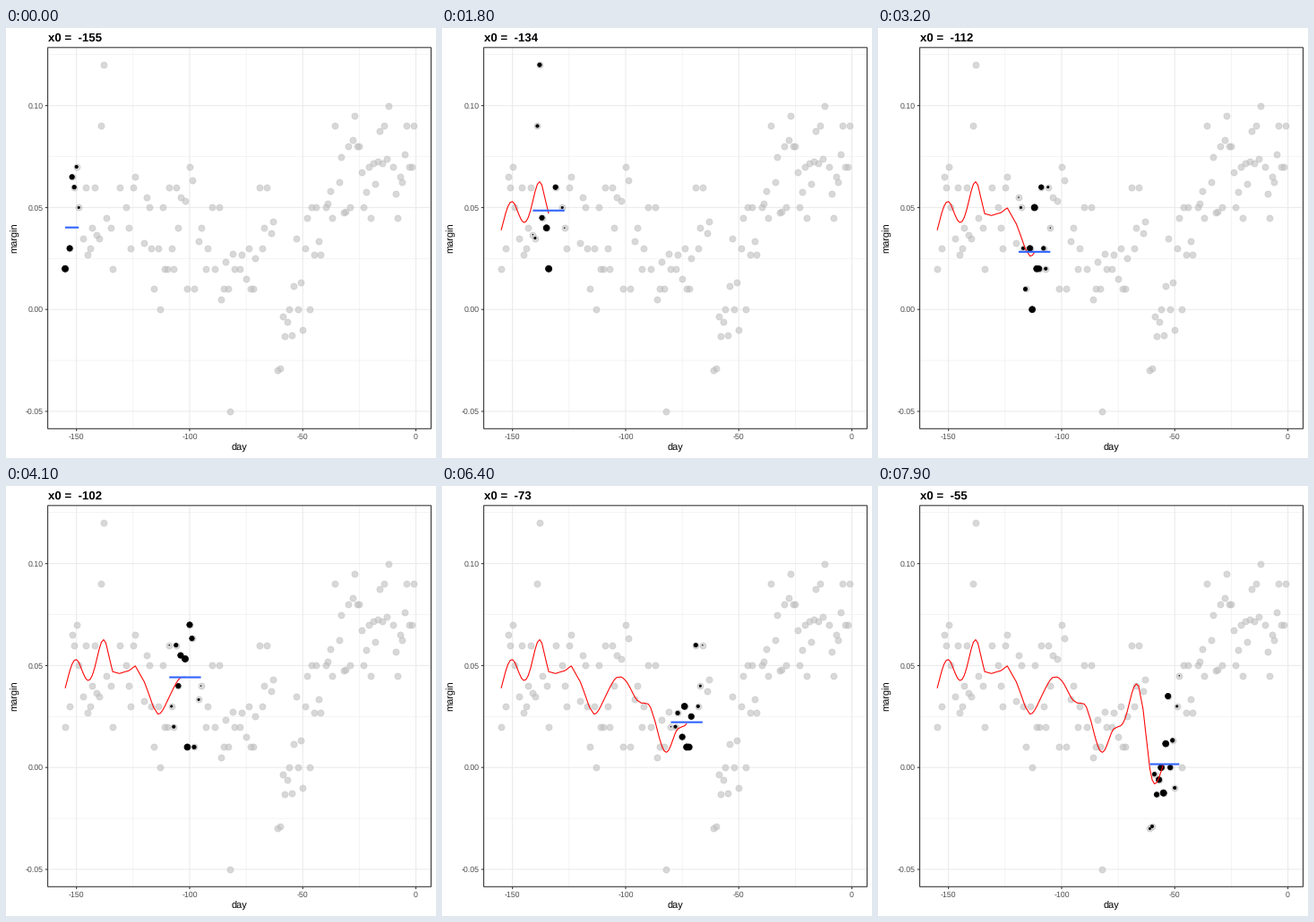
Recreate the animation shown at these times as a matplotlib script. Size 480x480 px, loop 8000 ms.

```python
import numpy as np
import matplotlib.pyplot as plt
from matplotlib.animation import FuncAnimation
from matplotlib.patches import Rectangle

plt.rcParams.update({"path.snap": False, "text.hinting": "none",
                     "font.family": "Liberation Sans"})

SIZE, DPI = 480, 72
FRAMES, INTERVAL = 80, 100
LEFT, RIGHT, TOP, BOTTOM = 46.6, 474.5, 21.8, 447.3
X_MIN, X_MAX, Y_MIN, Y_MAX = -162.7, 6.7, -0.0585, 0.1285
THIN, LINE, THICK = 0.53, 1.07, 2.13
WINDOW, LOCAL_SD = 7, 2.8
CURVE_SD = 0.3706506 * WINDOW

SKIPPED = {-154, -148, -136, -133, -132, -130, -129, -123, -122, -121, -115,
           -103, -97, -94, -91, -88, -79, -76, -70, -65, -62, -41, -35, -11}
days = np.array([d for d in range(-155, 0) if d not in SKIPPED])
# margins in percent, one per day
margin = np.array([
    2, 3, 6.5, 6, 7, 5, 3.5, 6, 2.67, 3, 4, 6, 3.67, 3.5, 9, 12, 4.5, 4, 2, 6,
    5, 4, 3, 6, 6.5, 3.25, 5.5, 5, 3, 1, 3, 0, 5, 2, 2, 6, 3, 2, 6, 4,
    5.5, 5.33, 1, 7, 6.33, 1, 3.33, 4, 2, 3, 5, 2, 5, 0.5, 1, 2.33, 1, -5,
    2.75, 2, 2, 2.67, 1.5, 3, 1, 1, 2.5, 6, 3, 4, 6, 3.75, 4.33, -3, -2.89,
    -0.33, -1.33, -0.6, 0, -1.25, 1.17, 3.5, 0, 1.33, -1, 3, 4.5, 0, 5, 2.67,
    5, 3.33, 2.67, 5, 5.2, 5.83, 4.5, 9, 6.25, 7.5, 4.75, 4.8, 8, 5, 8.33,
    9.5, 8, 8, 6.75, 5, 5.75, 7, 4.5, 7.17, 6.17, 7.25, 8.75, 7.17, 9, 7.4,
    10, 7, 5.67, 4.5, 6.5, 6.25, 7.6, 9, 7, 7, 9]) / 100


def px(day):
    return LEFT + (day - X_MIN) / (X_MAX - X_MIN) * (RIGHT - LEFT)


def py(value):
    return BOTTOM - (value - Y_MIN) / (Y_MAX - Y_MIN) * (BOTTOM - TOP)


def gauss(dist, sd):
    return np.exp(-0.5 * (dist / sd) ** 2)


def kernel_mean(x0):
    dist = np.abs(days - x0)
    w = gauss(dist, CURVE_SD) * (dist <= 4 * CURVE_SD)
    return w @ margin / w.sum()


def dot_width(size):
    return 0.75 * (2.845 * size + 0.945)


curve = np.array([kernel_mean(d) for d in days])

fig = plt.figure(figsize=(SIZE / DPI, SIZE / DPI), dpi=DPI, facecolor="white")
ax = fig.add_axes([0, 0, 1, 1])
ax.set_xlim(0, SIZE)
ax.set_ylim(SIZE, 0)
ax.axis("off")


def segment(x, y, color, width, z):
    return ax.plot(x, y, color=color, lw=width, zorder=z,
                   solid_capstyle="butt", solid_joinstyle="round")[0]


def label(x, y, text, size, color="black", ha="center", **kw):
    return ax.text(x, y, text, fontsize=size, color=color, ha=ha,
                   va="baseline", **kw)


def v_grid(day, width):
    segment([px(day)] * 2, [TOP, BOTTOM], "#ebebeb", width, 1)


def h_grid(value, width):
    segment([LEFT, RIGHT], [py(value)] * 2, "#ebebeb", width, 1)


for d in (-125, -75, -25):
    v_grid(d, THIN)
for v in (-0.025, 0.025, 0.075, 0.125):
    h_grid(v, THIN)
for d in (-150, -100, -50, 0):
    v_grid(d, LINE)
    segment([px(d)] * 2, [BOTTOM, BOTTOM + 2.75], "#333333", LINE, 2)
    label(px(d), 458.8, str(d), 8.8, "#4d4d4d")
for v in (-0.05, 0, 0.05, 0.1):
    h_grid(v, LINE)
    segment([LEFT - 2.75, LEFT], [py(v)] * 2, "#333333", LINE, 2)
    label(LEFT - 4.95, py(v) + 3.15, f"{v:.2f}", 8.8, "#4d4d4d", "right")

label((LEFT + RIGHT) / 2, 472, "day", 11)
label(13.4, (TOP + BOTTOM) / 2, "margin", 11, rotation=90,
      rotation_mode="anchor")
title = label(LEFT, 15, "", 13.2, ha="left", weight="bold")

ax.scatter(px(days), py(margin), s=dot_width(3) ** 2, color="#bebebe",
           alpha=0.6, lw=0.71, zorder=3)
near_dots = ax.scatter([], [], color="black", lw=0.71, zorder=4)
trail = segment([], [], "red", LINE, 5)
level = segment([], [], "#3366ff", THICK, 6)
ax.add_patch(Rectangle((LEFT, TOP), RIGHT - LEFT, BOTTOM - TOP, fill=False,
                       ec="#333333", lw=LINE, zorder=7))


def update(i):
    x0 = days[i]
    near = np.abs(days - x0) <= WINDOW
    x, y = days[near], margin[near]
    w = gauss(x - x0, LOCAL_SD)
    w_min = gauss(WINDOW, LOCAL_SD)
    size = 3 * np.sqrt(np.clip((w - w_min) / (1 - w_min), 0, 1))
    near_dots.set_offsets(np.column_stack([px(x), py(y)]))
    near_dots.set_sizes(dot_width(size) ** 2)
    mean = py(w @ y / w.sum())
    level.set_data([px(x[0]), px(x[-1])], [mean, mean])
    trail.set_data(px(days[:i + 1]), py(curve[:i + 1]))
    title.set_text(f"x0 =  {x0}")
    return near_dots, level, trail, title


anim = FuncAnimation(fig, update, frames=FRAMES, interval=INTERVAL,
                     repeat=True, repeat_delay=0, blit=False)
plt.show()
```
